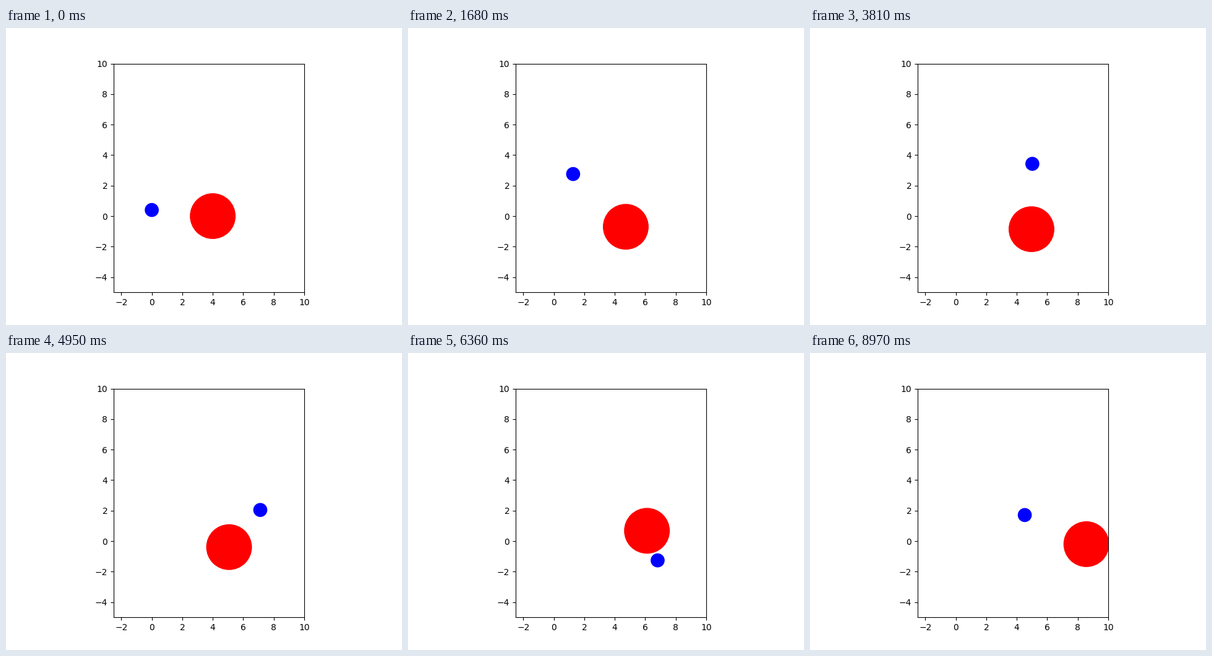
Recreate the animation shown at these times as a matplotlib script. Size 640 by 480 pixels, loop 9000 ms.

```python
import numpy as np
import matplotlib.pyplot as plt
from matplotlib.animation import FuncAnimation
from matplotlib.patches import Circle

FRAMES = 300
INTERVAL = 30
SUBSTEPS = 5
DT = 0.01
G = 6.67


class Body:
    def __init__(self, mass, radius, pos, vel, color):
        self.mass = mass
        self.pos = np.array(pos, float)
        self.vel = np.array(vel, float)
        self.patch = Circle(pos, radius, facecolor=color, linewidth=0)

    def step(self, other):
        gap = other.pos - self.pos
        self.vel += G * other.mass * gap / np.hypot(*gap) ** 3 * DT
        self.pos += self.vel * DT


def simulate(a, b):
    """Return both paths, one point per frame."""
    path = np.empty((FRAMES, 2, 2))
    for k in range(FRAMES):
        path[k] = a.pos, b.pos
        for _ in range(SUBSTEPS):
            a.step(b)
            b.step(a)
    return path


small = Body(0.314, 0.46, (0, 0.4), (0, 1), "blue")
large = Body(1.0, 1.5, (4, 0), (0.4, -0.3), "red")
bodies = small, large
path = simulate(small, large)

fig, ax = plt.subplots(figsize=(6.4, 4.8), dpi=100)
ax.set_aspect("equal")
ax.set_xlim(-2.5, 10)
ax.set_ylim(-5, 10)
ax.set_xticks(range(-2, 11, 2))
ax.set_yticks(range(-4, 11, 2))
for body in bodies:
    ax.add_patch(body.patch)


def draw(k):
    for body, center in zip(bodies, path[k]):
        body.patch.center = center
    return [body.patch for body in bodies]


anim = FuncAnimation(fig, draw, frames=FRAMES, interval=INTERVAL,
                     repeat=True, repeat_delay=0, blit=False)
plt.show()
```
